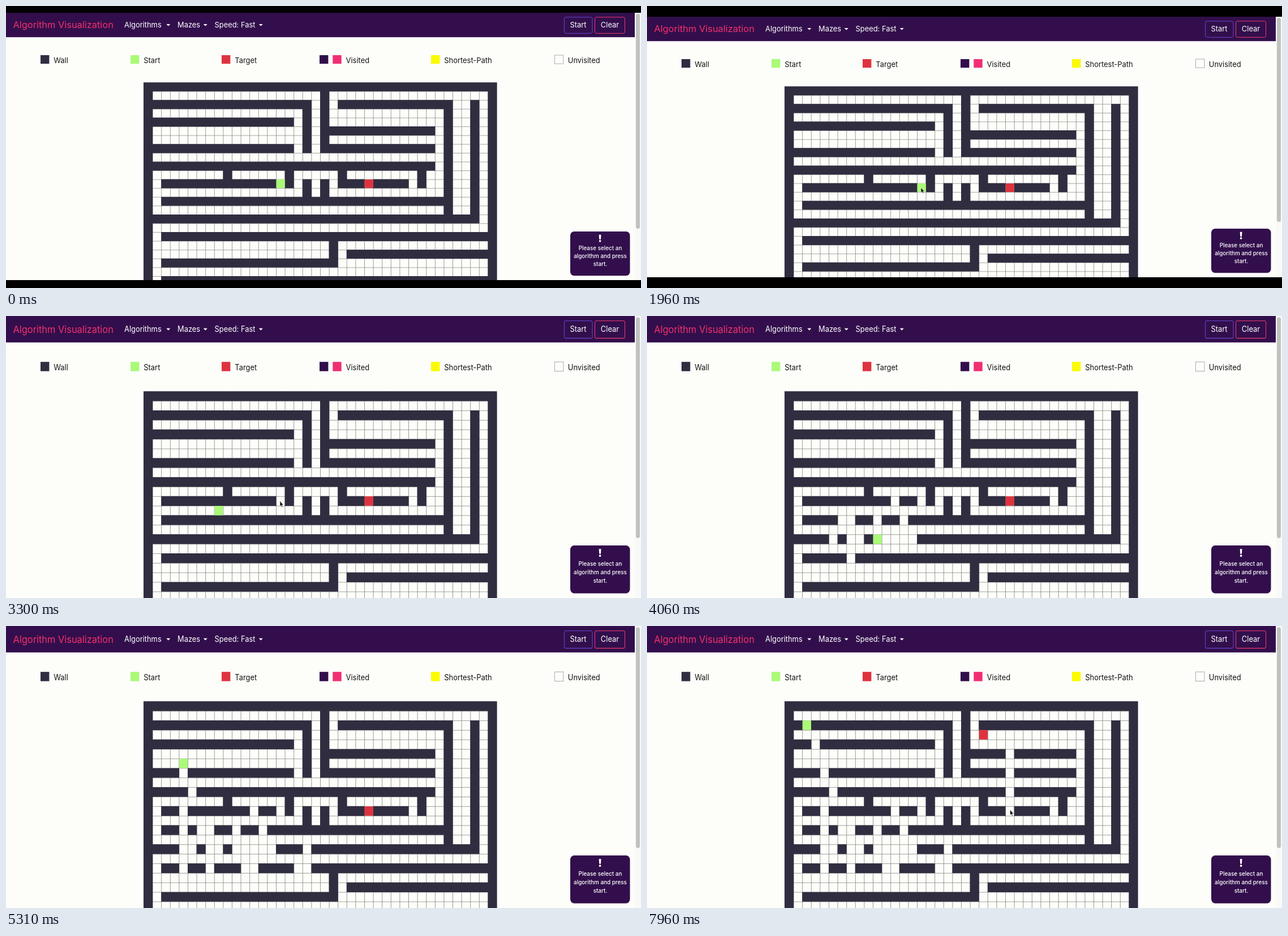
Recreate the animation shown at these times as an HTML page. Size 1122 by 499 pixels, loop 8 s.

```html
<!DOCTYPE html>
<html lang="en">
<head>
<meta charset="utf-8">
<title>Algorithm Visualization</title>
<style>
  html, body { margin: 0; width: 100%; height: 100%; overflow: hidden; background: #000; }
  #stage { display: block; width: 1122px; height: 499px; }
  text { font: 12.9px Inter, "Open Sans", sans-serif; fill: #151515; }
  .nav text { fill: #fff; }
  .nav .brand { font-size: 16.4px; fill: #f32f6c; }
  .mid { text-anchor: middle; }
  .note text { font-size: 9.9px; font-weight: 500; fill: #fff; text-anchor: middle; }
</style>
</head>
<body>
<svg id="stage" viewBox="0 0 1122 499">
  <defs>
    <pattern id="cell" x="243" y="123.2" width="15.6" height="15.58" patternUnits="userSpaceOnUse">
      <path d="M0 .4H15.6M.5 0V15.58" stroke="#85857f" stroke-width=".8"/>
    </pattern>
  </defs>
  <svg id="page" width="1122" preserveAspectRatio="none">
    <rect width="1122" height="500" fill="#fdfdfa"/>
    <g class="nav">
      <rect width="1111" height="43.2" fill="#320f4c"/>
      <text class="brand" x="12.5" y="27.3">Algorithm Visualization</text>
      <text x="209" y="26.3">Algorithms</text>
      <text x="303" y="26.3">Mazes</text>
      <text x="368.5" y="26.3">Speed: Fast</text>
      <path fill="#fff" d="M283.3 20h7l-3.5 3.5zM348.8 20h7l-3.5 3.5zM446.8 20h7l-3.5 3.5z"/>
      <rect x="986.5" y="7.8" width="49.5" height="28.6" rx="3" fill="none" stroke="#6a43d0"/>
      <rect x="1040.5" y="7.8" width="53" height="28.6" rx="3" fill="none" stroke="#ee3a72"/>
      <text class="mid" x="1011" y="26.3">Start</text>
      <text class="mid" x="1067" y="26.3">Clear</text>
    </g>
    <g id="legend"></g>
    <rect x="243" y="123.2" width="624" height="376" fill="url(#cell)"/>
    <path id="walls" fill="#312d40"/>
    <rect id="start" width="15.2" height="15.3" fill="#aafa78"/>
    <rect id="target" width="15.2" height="15.3" fill="#df323f"/>
    <g class="note" id="note">
      <rect x="997" width="105.5" height="78.3" rx="7" fill="#320f4c"/>
      <path fill="#fff" d="M1047.7 5.8h3.8l-.6 8.2h-2.6z"/>
      <circle cx="1049.6" cy="16.9" r="1.8" fill="#fff"/>
      <text x="1050" y="33">Please select an</text>
      <text x="1050" y="47">algorithm and press</text>
      <text x="1050" y="61">start.</text>
    </g>
    <rect x="1111" width="11" height="500" fill="#f9f9f7"/>
    <rect id="thumb" x="1113" y="2" width="7" rx="3.5" fill="#c1c1c0"/>
    <path id="cursor" d="M0 0V9L2 7.2 3.4 10.3 4.8 9.7 3.5 6.7H6.3Z" fill="#111" stroke="#fff" stroke-width=".6"/>
  </svg>
</svg>
<script>
const LOOP = 8000, COLS = 40, ROWS = 24;
const LEFT = 243, TOP = 123.2, CELL_W = 15.6, CELL_H = 15.58;
const $ = id => document.getElementById(id);
const setAttrs = (el, attrs) => {
  for (const name in attrs) el.setAttribute(name, attrs[name]);
};

function addLegend(x, label, ...fills) {
  const swatch = (fill, i) => `<rect x="${x + i * 23.3}" y="75" width="15.4" height="15.2"
    fill="${fill}" stroke="#a5a5b0" stroke-width="${fill === 'none' ? .9 : 0}"/>`;
  $('legend').innerHTML += fills.map(swatch).join('') +
    `<text x="${x + 23.3 * fills.length}" y="88.5">${label}</text>`;
}
addLegend(61, 'Wall', '#312d40');
addLegend(220, 'Start', '#aafa78');
addLegend(381, 'Target', '#df323f');
addLegend(554, 'Visited', '#320f4c', '#f02f73');
addLegend(751, 'Shortest-Path', '#fbfb00');
addLegend(969.5, 'Unvisited', 'none');

// The maze is a recursive division: each wall crosses its chamber
// from side to side and leaves one passage at its first or last cell.
const maze = Array.from({ length: ROWS }, (_, row) => Array.from({ length: COLS }, (_, col) =>
  row === 0 || col === 0 || row === ROWS - 1 || col === COLS - 1));

function divide(row, col, down, across, passage) {
  const span = [];
  for (; !maze[row][col]; row += down, col += across) span.push([row, col]);
  if (passage === 'first') span.shift();
  if (passage === 'last') span.pop();
  for (const [r, c] of span) maze[r][c] = true;
}
const across = (row, col, passage) => divide(row, col, 0, 1, passage);
const down = (col, row, passage) => divide(row, col, 1, 0, passage);

across(15, 1, 'last');
for (const row of [17, 22]) across(row, 1, 'first');
for (const col of [37, 34]) down(col, 1, 'first');
across(9, 1, 'last');
down(20, 1, 'last');
across(2, 1, 'last');
across(2, 21, 'first');
down(18, 3, 'last');
for (const row of [4, 7]) across(row, 1, 'last');
for (const row of [5, 7]) across(row, 21, 'last');
across(13, 1, 'first');
for (const col of [16, 22, 31]) down(col, 10, 'last');
for (const col of [18, 20]) down(col, 10, 'first');
across(11, 1, 'first');
down(9, 10);
across(11, 23, 'last');
down(21, 18, 'last');
across(20, 1, 'first');
across(19, 22, 'first');

// Straight strokes between "column,row" corners, one cell at a time, at an even pace.
function drag(from, to, corners) {
  const points = corners.split(' ').map(corner => corner.split(',').map(Number));
  const cells = [points[0]];
  points.slice(1).forEach(([col, row], i) => {
    const [col0, row0] = points[i];
    const steps = Math.max(Math.abs(col - col0), Math.abs(row - row0));
    for (let s = 1; s <= steps; s++)
      cells.push([col0 + (col - col0) * s / steps, row0 + (row - row0) * s / steps].map(Math.round));
  });
  return cells.map(([col, row], i) => ({ time: from + (to - from) * i / (cells.length - 1), col, row }));
}
const startPath = [
  ...drag(3080, 3290, '15,11 14,12 8,12'),
  ...drag(3330, 4710, '8,12 7,13 6,13 5,15 7,17 8,15 7,15 8,14 10,13 12,11 13,13 14,15 10,15 ' +
    '12,17 13,18 16,18 17,17 18,17 18,15 18,16 11,16 11,18'),
  ...drag(4760, 5410, '11,18 5,18 4,17 4,10 5,9 4,7 3,4 2,2')
];
const targetPath = drag(7200, 7940, '25,11 25,4 24,3 22,3');

// Window position and size; the last one fills the stage.
const views = [
  { time: 0, y: 12, height: 473, inner: 473 },
  { time: 50, y: 19, height: 461, inner: 461 },
  { time: 2700, y: 0, height: 499, inner: 461 }
];

const moves = [
  { show: 590, arrive: 1950, hide: 3810, from: [766, 267], to: [484, 302.4] },
  { show: 6680, arrive: 7180, hide: LOOP, from: [462, 220.5], to: [641.5, 300.3] }
];

const reached = (list, t) => list.filter((item, i) => i === 0 || item.time <= t);
const place = (el, { col, row }) =>
  setAttrs(el, { x: LEFT + col * CELL_W + .6, y: TOP + row * CELL_H + .3 });

function wallPath(cleared) {
  const open = new Set(cleared.map(({ col, row }) => row * COLS + col));
  const isWall = (row, col) => col < COLS && maze[row][col] && !open.has(row * COLS + col);
  let d = '';
  for (let row = 0; row < ROWS; row++) {
    for (let col = 0; col < COLS; col++) {
      const first = col;
      while (isWall(row, col)) col++;
      if (col > first) {
        const width = (col - first) * CELL_W + .6, height = CELL_H + .3;
        d += `M${LEFT + first * CELL_W} ${TOP + row * CELL_H}h${width}v${height}h${-width}z`;
      }
    }
  }
  return d;
}

function drawCursor(t) {
  const move = moves.find(m => t >= m.show && t < m.hide);
  $('cursor').style.display = move ? '' : 'none';
  if (!move) return;
  const p = Math.min(1, (t - move.show) / (move.arrive - move.show));
  const eased = p * p * (3 - 2 * p);
  const [x, y] = move.from.map((v, i) => v + (move.to[i] - v) * eased);
  setAttrs($('cursor'), { transform: `translate(${x} ${y})` });
}

function draw(t) {
  const { y, height, inner } = reached(views, t).pop();
  setAttrs($('page'), { y, height, viewBox: `0 0 1122 ${inner}` });
  setAttrs($('note'), { transform: `translate(0 ${inner - 86})` });
  setAttrs($('thumb'), { height: 361 * (inner / 461) ** 2 });

  const starts = reached(startPath, t), targets = reached(targetPath, t);
  const cleared = [[startPath, starts], [targetPath, targets]].flatMap(([, cells]) => cells);
  setAttrs($('walls'), { d: wallPath(cleared) });
  place($('start'), starts.pop());
  place($('target'), targets.pop());
  drawCursor(t);
}

const origin = performance.now();
function tick() {
  draw((performance.now() - origin) % LOOP);
  requestAnimationFrame(tick);
}
tick();
</script>
</body>
</html>
```
